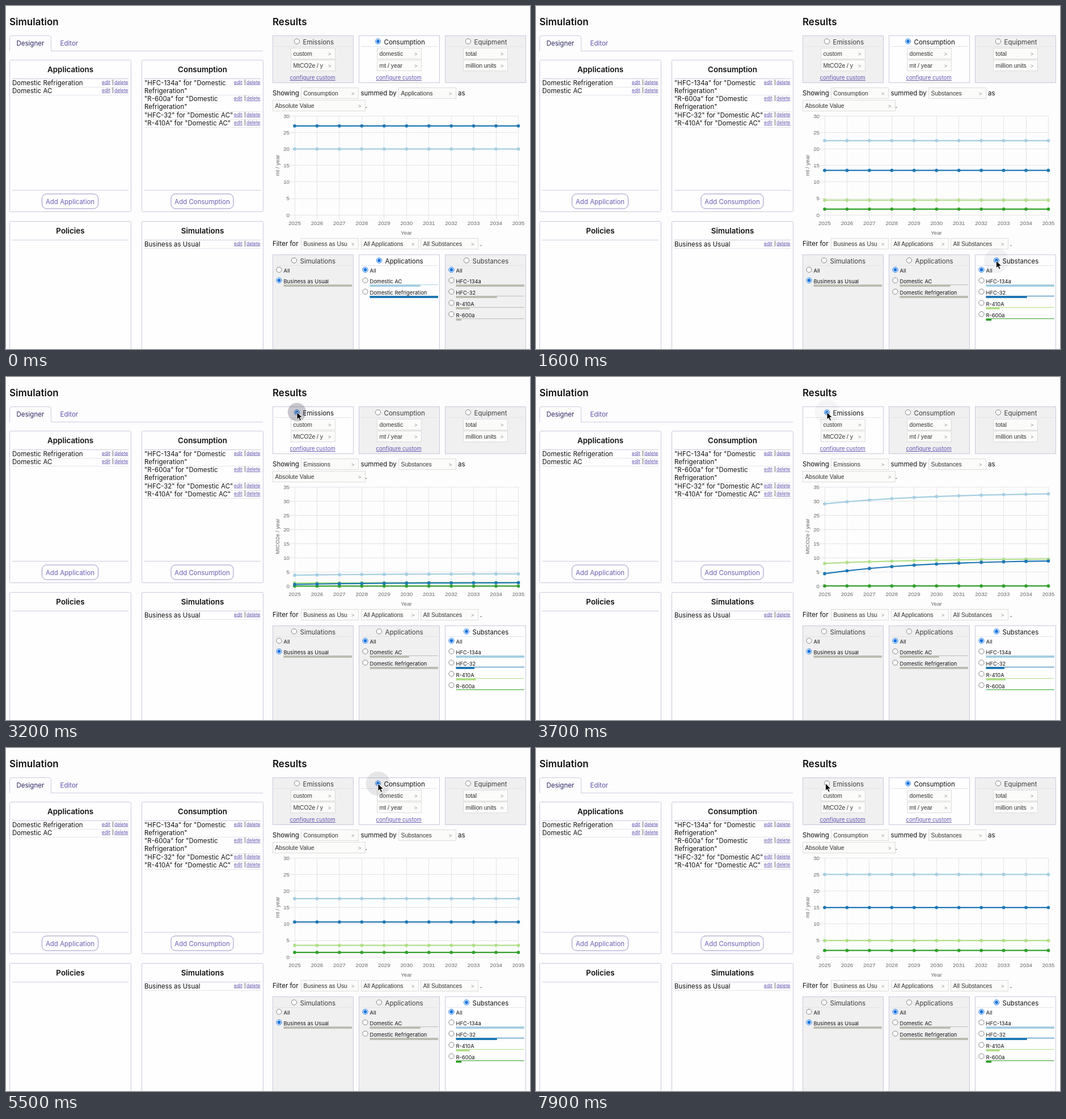
Write an HTML page that moves like this. It is 924 by 606 pixels and loops after 8000 ms.

```html
<!DOCTYPE html>
<html lang="en">
<head>
<meta charset="utf-8">
<title>Simulation results</title>
<style>
html, body { margin: 0; width: 100%; height: 100%; overflow: hidden; background: #fdfdfd; }
svg { display: block; width: 924px; height: 606px; }
text { font: 11.5px Inter, sans-serif; fill: #111; white-space: pre; }
.h1 { font-size: 17px; font-weight: 600; }
.h2 { font-size: 13.4px; font-weight: 600; text-anchor: middle; }
.btn { text-anchor: middle; fill: #6a60b4; }
.tab { fill: #5a50a8; }
.on { fill: #2a2660; }
.link { font-size: 8.4px; fill: #6054ae; text-decoration: underline; }
.bar { font-size: 8.4px; }
.conf { font-size: 9.7px; }
.dim { fill: #3c3c3c; }
.item { font-size: 9.3px; }
.sel { font: 10.4px "Liberation Sans", Arial, sans-serif; fill: #333; }
.chev { font: 9px "Liberation Sans", Arial, sans-serif; fill: #888; }
.tick { font: 9.7px "Liberation Sans", Arial, sans-serif; fill: #666; }
.mid { text-anchor: middle; }
.end { text-anchor: end; }
</style>
</head>
<body>
<svg id="stage" viewBox="0 0 924 606"></svg>
<script>
const LOOP = 8000, STEP = 100, EDGE = '#c9c9dd', RULE = '#cbcbdd', MUTED = '#bcbcb1';
const BLUES = ['#a6cee3', '#1f78b4'], PAIRED = [...BLUES, '#b2df8a', '#33a02c'];
const COLS = [470, 622, 774];

// Each view: start of its chart animation, selected metric, grouping, click position
const VIEWS = [
  { at: -2000, metric: 1, group: 1 },
  { at: 1160, metric: 1, group: 2, x: 812, y: 450 },
  { at: 3167, metric: 0, group: 2, x: 513, y: 62 },
  { at: 5235, metric: 1, group: 2, x: 656, y: 63 }
];
// Pointer stops: time, x, y
const PATH = [
  [0, 840, 640], [200, 840, 640], [800, 810.5, 449.5], [1100, 811.5, 450], [2000, 811.5, 450],
  [2900, 513, 62], [4000, 513, 62], [4760, 656, 63], [7100, 656, 63], [7700, 510.5, 62.5], [LOOP, 510.5, 62.5]
];

const text = (x, y, s, cls = '') => `<text x="${x}" y="${y}" class="${cls}">${s}</text>`;
const box = (x, y, w, h, fill = '#fefefe', stroke = EDGE, r = 0) =>
  `<rect x="${x}" y="${y}" width="${w}" height="${h}" rx="${r}" fill="${fill}" stroke="${stroke}"/>`;
const line = (x1, y1, x2, y2, color = RULE) =>
  `<path d="M${x1} ${y1}L${x2} ${y2}" stroke="${color}"/>`;
const radio = (x, y, on) =>
  `<circle cx="${x}" cy="${y}" r="4.6" fill="#fff" stroke="${on ? '#1673e0' : '#808080'}"/>` +
  (on ? `<circle cx="${x}" cy="${y}" r="2.9" fill="#1673e0"/>` : '');
const select = (x, y, w, s, pad = 4.5) =>
  box(x + .5, y + .5, w - 1, 19, '#fbfbfa', '#dcdcdc') + text(x + pad, y + 14, s, 'sel') + text(x + w - 13, y + 13.5, '&gt;', 'chev');
const actions = (right, y) =>
  text(right - 47, y, 'edit', 'link') + text(right - 29, y, '|', 'bar') + text(right - 25, y, 'delete', 'link');

function card(x, y, title, rows, button) {
  let s = box(x + .5, y + .5, 214, 268, '#fefefe', EDGE, 2) + text(x + 107.5, y + 21.5, title, 'h2') +
    line(x + 5, y + 33.5, x + 210, y + 33.5);
  let base = y + 44.5;
  for (const row of rows) {
    s += actions(x + 210, base - 2);
    for (const part of row.split('\n')) {
      s += text(x + 5, base, part);
      base += 14.3;
    }
    s += line(x + 5, Math.round(base - 11) + .5, x + 210, Math.round(base - 11) + .5, '#e4e4ee');
  }
  if (button) s += line(x + 5, 325.5, x + 210, 325.5) + box(x + 57.5 - button[1], 332, 99 + 2 * button[1], 26, '#fefefe', '#9a92c8', 8) +
    text(x + 107, 349.5, button[0], 'btn');
  return s;
}

function designer() {
  return text(6, 34, 'Simulation', 'h1') + text(470, 34, 'Results', 'h1') +
    `<path d="M6.5 80V56q0-3.500 3.500-3.500H76q3.500 0 3.500 3.500V79.500H453" fill="none" stroke="${RULE}"/>` +
    text(18.5, 70, 'Designer', 'tab on') + text(95.5, 70, 'Editor', 'tab') +
    card(6, 95, 'Applications', ['Domestic Refrigeration', 'Domestic AC'], ['Add Application', 0]) +
    card(239, 95, 'Consumption', ['"HFC-134a" for "Domestic\nRefrigeration"', '"R-600a" for "Domestic\nRefrigeration"',
      '"HFC-32" for "Domestic AC"', '"R-410A" for "Domestic AC"'], ['Add Consumption', 5.5]) +
    card(6, 380, 'Policies', []) + card(239, 380, 'Simulations', ['Business as Usual']);
}

function panel(i, y, h, active, title, rx, ruleY) {
  const x = COLS[i];
  return box(x + .5, y + .5, 142, h, active ? '#fefefe' : '#f0f0f1') +
    line(x + 4, ruleY, x + 139, ruleY, '#e2e2ea') + radio(rx, y + 10.5, active) +
    text(rx + 10.5, y + 15.5, title, active ? '' : 'dim');
}

function metrics(v) {
  const list = [['Emissions', 513, 'custom', 'MtCO2e / y'], ['Consumption', 656, 'domestic', 'mt / year'], ['Equipment', 815, 'total', 'million units']];
  return list.map(([name, rx, a, b], i) => panel(i, 52, 83, v.metric === i, name, rx, 71.5) +
    select(COLS[i] + 32, 74, 79, a) + select(COLS[i] + 32, 95, 79, b) +
    (i < 2 ? text(COLS[i] + 30.5, 130, 'configure custom', 'link conf') : '')).join('') +
    text(470, 158, 'Showing') + select(520, 144, 102, list[v.metric][0]) + text(625.5, 158, 'summed by') +
    select(692, 144, 102, v.group === 1 ? 'Applications' : 'Substances') + text(797, 158, 'as') +
    select(470, 166, 164, 'Absolute Value') + text(633.5, 180, '.');
}

// Value approaching a limit over the years
const rise = (from, gain, k) => i => from + gain * (1 - Math.exp(-k * i));
const flat = value => () => value;

function chart(v, t) {
  const emissions = v.metric === 0, max = emissions ? 35 : 30;
  const X = i => 509 + 39.45 * i, Y = n => 369.3 - n * 175 / max;
  const crisp = n => Math.floor(n) + .5;
  const grow = 1 - (1 - Math.min(1, Math.max(0, (t - v.at) / 1000))) ** 4;
  let s = '';
  for (let n = 0; n <= max; n += 5)
    s += line(500, crisp(Y(n)), 903.5, crisp(Y(n)), '#e4e4ea') + text(500, Y(n) + 3.3, n, 'tick end');
  for (let i = 0; i <= 10; i++)
    s += line(crisp(X(i)), 194, crisp(X(i)), 377, '#e4e4ea') + text(X(i), 387, 2025 + i, 'tick mid');
  s += text(706, 403.5, 'Year', 'tick mid') +
    `<text class="tick mid" transform="translate(481.500 281.500) rotate(-90)">${emissions ? 'MtCO2e / year' : 'mt / year'}</text>`;
  const series = emissions ? [rise(30.5, 4.28, .2), rise(4.6, 5.22, .23), rise(8.4, 1.85, .2), flat(.03)]
    : (v.group === 1 ? [20, 27] : [25, 15, 5, 2]).map(flat);
  for (let k = series.length - 1; k >= 0; k--) {
    const pts = Array.from({ length: 11 }, (_, i) => [X(i), Y(series[k](i) * grow)]);
    s += `<polyline points="${pts.join(' ')}" fill="none" stroke="${PAIRED[k]}" stroke-width="2.200"/>` +
      pts.map(([x, y]) => `<circle cx="${x}" cy="${y}" r="2.900" fill="${PAIRED[k]}"/>`).join('');
  }
  return s;
}

function filters(v) {
  const em = v.metric === 0;
  const list = [
    ['Simulations', 508, ['Business as Usual'], [1], 1],
    ['Applications', 658, ['Domestic AC', 'Domestic Refrigeration'], [em ? .575 : .74, 1], 0],
    ['Substances', 812, ['HFC-134a', 'HFC-32', 'R-410A', 'R-600a'], em ? [1, .27, .29, 0] : [1, .6, .2, .08], 0]
  ];
  let s = text(470, 424, 'Filter for') + select(520, 410, 102, 'Business as Usu') +
    select(626, 410, 102, 'All Applications') + select(731, 410, 102, 'All Substances') + text(836, 424, '.');
  list.forEach(([name, rx, items, bars, chosen], i) => {
    const x = COLS[i], active = v.group === i;
    s += panel(i, 439, 180, active, name, rx, 458.5) + radio(x + 11.5, 466, chosen === 0) + text(x + 19.5, 471, 'All', 'item');
    items.forEach((label, k) => {
      const y = 485 + 19.9 * k, top = Math.round(y + 7), color = active ? PAIRED[k] : MUTED;
      s += radio(x + 11.5, y - .3, chosen === k + 1) + text(x + 19.5, y + 5, label, 'item') +
        line(x + 19.5, top + .5, x + 140, top + .5, color) +
        `<rect x="${x + 19.5}" y="${top}" width="${120.5 * bars[k]}" height="4" fill="${color}"/>`;
    });
  });
  return s;
}

function pointer(t) {
  const n = PATH.findIndex(p => p[0] > t), [t0, x0, y0] = PATH[n - 1], [t1, x1, y1] = PATH[n];
  const u = (t - t0) / (t1 - t0), e = u * u * (3 - 2 * u);
  let s = '';
  for (const v of VIEWS) {
    const age = t - v.at + 100;
    if (v.x && age > 0 && age < 900)
      s += `<circle cx="${v.x}" cy="${v.y}" r="${22 * (1 - Math.exp(-age / 100))}" fill="#202038" opacity="${.4 * Math.exp(-age / 265)}"/>`;
  }
  return s + `<path transform="translate(${x0 + (x1 - x0) * e} ${y0 + (y1 - y0) * e})" fill="#000" stroke="#fff" stroke-width=".9"
    d="M0 0V13L3 10.300L5.200 15.200L7.500 14.200L5.300 9.500H9.500Z"/>`;
}

const stage = document.getElementById('stage'), fixed = designer();
let shown = -1;
function frame(now) {
  const t = Math.floor(now % LOOP / STEP) * STEP;
  if (t !== shown) {
    shown = t;
    const v = VIEWS.filter(o => o.at <= t).pop();
    stage.innerHTML = fixed + metrics(v) + chart(v, t) + filters(v) + pointer(t);
  }
  requestAnimationFrame(frame);
}
frame(0);
</script>
</body>
</html>
```
